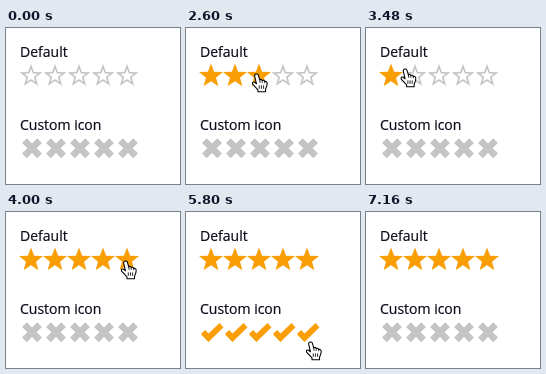
Write an HTML page that moves like this. It is 174x156 px and loops after 8.64 s.

```html
<!DOCTYPE html>
<html lang="en">
<head>
<meta charset="utf-8">
<title>Rating</title>
<style>
  html, body { margin: 0; width: 100%; height: 100%; overflow: hidden; background: #fff; }
  svg { display: block; width: 174px; height: 156px; }
  text { font: 14px "Open Sans", "Noto Sans", sans-serif; fill: #0a0a1a; stroke: #0a0a1a; stroke-width: .2px; }
</style>
</head>
<body>
<svg viewBox="0 0 174 156">
  <defs>
    <path id="cross" stroke="#c4c4c4" stroke-width="6.6" d="M-7.6-7.6L7.6 7.6M7.6-7.6L-7.6 7.6"/>
    <path id="check" fill="none" stroke="#f99f05" stroke-width="6" d="M-9 0L-3.5 5.5L9.5-7"/>
  </defs>
  <text x="14" y="29">Default</text>
  <text x="14" y="102">Custom icon</text>
  <g id="stars"></g>
  <g id="marks"></g>
  <g id="cursor">
    <g id="hand" transform="translate(-.5 0) scale(1.08)" stroke="#000" stroke-linejoin="round">
      <path fill="#fff" d="M3.6 1.2Q5.6.2 6.4 2.2L7.6 6.2Q9.3 5.4 9.9 6.9Q11.6 6.2 12.2 7.8Q14.3 7.4 14.5 9.4Q14.6 12 13 15V17.4H6V15.6L1 10.2Q.4 7.6 2.8 8.6L4.6 10L3 3.4Q2.6 1.8 3.6 1.2Z"/>
      <path fill="none" stroke-width=".8" d="M7.6 6.2L8 9M9.9 6.9V9M12.2 7.8V9.4M7.2 11.5V14.6M9.2 11.5V14.6M11.2 11.5V14.6"/>
    </g>
    <path id="arrow" transform="translate(4 1)" stroke="#fff" stroke-linejoin="round" d="M0 0V15L3.4 11.8L5.8 17.2L8.2 16.2L5.9 11H10.6Z"/>
  </g>
</svg>
<script>
const LOOP = 8640, STEP = 40, TIP = [4, 1], PITCH = 24;
const ENTER = 1520, CLICK = 4000, RESET = 6600, LEAVE = 7160;
const $ = id => document.getElementById(id);

// Each move: start, end, then points passed at even intervals.
// The pointer rests between moves.
const moves = [
  [1520, 2000, [66, 45]],
  [2600, 3240, [74, 40], [83, 36], [6, 44], [17, 46]],
  [3360, 4000, [64, 30], [115, 48]],
  [4120, 5000, [122, 30], [122, 98], [123, 121]],
  [5040, 5200, [112, 113]],
  [5520, 5800, [127, 122], [120, 129]],
  [5800, 6120, [9, 118], [119, 128]],
  [6840, 7120, [152, 131]]
];

function place(t) {
  let from = [53, -9];
  for (const [start, end, ...points] of moves) {
    if (t <= start) break;
    const path = [from, ...points];
    const p = Math.min(1, (t - start) / (end - start)) * points.length;
    const i = Math.min(points.length - 1, Math.floor(p));
    from = path[i].map((v, axis) => v + (path[i + 1][axis] - v) * (p - i));
  }
  return from;
}

// Number of icons up to the pointer in a row spanning top..bottom
function hovered(t, top, bottom) {
  if (t < ENTER) return 0;
  const [x, y] = place(t).map((v, axis) => v + TIP[axis]);
  if (x < 10 || x > 134 || y < top || y > bottom) return 0;
  return Math.max(1, Math.min(5, Math.ceil((x - 13) / PITCH)));
}
const overStars = t => hovered(t, 29, 64);
const overMarks = t => hovered(t, 110, 134);

function star(radius) {
  const points = Array.from({ length: 10 }, (_, i) => {
    const r = i % 2 ? radius * 0.42 : radius, a = i * Math.PI / 5;
    return [r * Math.sin(a), -r * Math.cos(a)].map(v => v.toFixed(2));
  });
  return `M${points.join("L")}Z`;
}
$("cross").parentNode.insertAdjacentHTML("beforeend",
  `<path id="outline" fill="#c4c4c4" fill-rule="evenodd" d="${star(12)}${star(7.2)}"/>
   <path id="star" fill="#f99f05" d="${star(12.6)}"/>`);

function makeRow(id, x, y, off, on) {
  const use = (name, i) => `<use href="#${name}" x="${x + PITCH * i}" y="${y}"/>`;
  $(id).innerHTML = [0, 1, 2, 3, 4].map(i => `<g>${use(off, i)}${use(on, i)}</g>`).join("");
  return (count, fade = 1) => [...$(id).children].forEach((g, i) => {
    const shown = i < count ? fade : 0;
    g.children[0].setAttribute("opacity", 1 - shown);
    g.children[1].setAttribute("opacity", shown);
  });
}
const setStars = makeRow("stars", 25, 48, "outline", "star");
const setMarks = makeRow("marks", 26, 120.2, "cross", "check");

function draw(now) {
  const t = Math.floor((now % LOOP) / STEP) * STEP;
  const lag = t - STEP;
  setStars(t >= CLICK ? 5 : overStars(lag));
  setMarks(t <= RESET ? overMarks(lag) : 0, t < RESET ? 1 : 0.5);

  const [x, y] = place(t), pointing = overStars(t) || overMarks(t);
  $("cursor").setAttribute("transform", `translate(${x} ${y})`);
  $("cursor").style.display = t >= ENTER && t < LEAVE ? "" : "none";
  $("hand").style.display = pointing ? "" : "none";
  $("arrow").style.display = pointing ? "none" : "";
}

const start = performance.now();
function tick() {
  draw(performance.now() - start);
  requestAnimationFrame(tick);
}
tick();
</script>
</body>
</html>
```
